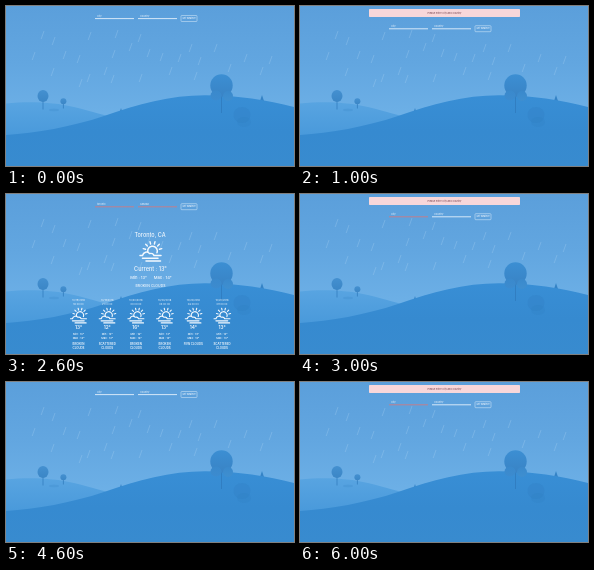
Write an HTML page with a canvas that moves like this. It is 288 px wide and 160 px high and loops after 7000 ms.

```html
<!DOCTYPE html>
<html lang="en">
<head>
<meta charset="utf-8">
<title>Weather</title>
<style>
html, body { margin: 0; width: 100%; height: 100%; overflow: hidden; background: #64a9df; }
canvas { display: block; width: 288px; height: 160px; }
</style>
</head>
<body>
<canvas id="stage"></canvas>
<script>
const W = 288, H = 160, STEP = 1000;
const FONT = 'Inter, "Liberation Sans", sans-serif';
const WHITE = '#f4f9fe', RED = '#d8787c', PINK = '#f8d7da';

const canvas = document.getElementById('stage');
const ctx = canvas.getContext('2d');
const ratio = window.devicePixelRatio || 1;
canvas.width = W * ratio;
canvas.height = H * ratio;
ctx.scale(ratio, ratio);

const SCHEDULE = ['empty', 'warning', 'weather', 'retry', 'empty', 'weather', 'retry'];

const RAIN = [
  [38, 25], [49, 31], [85, 26], [112, 24], [29, 46], [60, 45], [74, 49],
  [109, 44], [126, 37], [135, 28], [144, 43], [157, 47], [166, 61], [175, 48],
  [186, 38], [191, 66], [211, 38], [241, 48], [257, 61], [266, 50], [108, 69],
  [84, 68], [76, 73], [101, 61], [136, 68], [225, 58], [48, 62], [195, 51]
];

const FORECAST = [
  ['10/19/2018', '18:00:00', 13, 'BROKEN'],
  ['10/19/2018', '21:00:00', 12, 'SCATTERED'],
  ['10/20/2018', '00:00:00', 16, 'BROKEN'],
  ['10/20/2018', '03:00:00', 13, 'BROKEN'],
  ['10/20/2018', '06:00:00', 14, 'FEW CLOUDS'],
  ['10/20/2018', '09:00:00', 13, 'SCATTERED']
];

function vertical(y0, y1, ...colors) {
  const g = ctx.createLinearGradient(0, y0, 0, y1);
  colors.forEach((c, i) => g.addColorStop(i / (colors.length - 1), c));
  return g;
}

function text(str, x, y, size, weight = 400, color = WHITE, align = 'center') {
  ctx.font = `${weight} ${size}px ${FONT}`;
  ctx.textAlign = align;
  ctx.textBaseline = 'middle';
  ctx.fillStyle = color;
  ctx.fillText(str, x, y);
}

function line(x0, y0, x1, y1, color, width) {
  ctx.strokeStyle = color;
  ctx.lineWidth = width;
  ctx.beginPath();
  ctx.moveTo(x0, y0);
  ctx.lineTo(x1, y1);
  ctx.stroke();
}

function fillPath(path, fill) {
  ctx.fillStyle = fill;
  ctx.fill(new Path2D(path));
}

function ellipse(x, y, rx, ry, fill) {
  ctx.fillStyle = fill;
  ctx.beginPath();
  ctx.ellipse(x, y, rx, ry, 0, 0, Math.PI * 2);
  ctx.fill();
}

function tree(x, y, rx, ry, foot, top, bottom) {
  line(x, y, x, foot, '#2f79ba', 0.7);
  ellipse(x, y, rx, ry, vertical(y - ry, y + ry, top, bottom));
}

function pine(x, foot) {
  fillPath(`M${x} ${foot - 5} l2 6 h-4Z`, '#3583c6');
}

function landscape() {
  ctx.fillStyle = vertical(0, 115, '#5b9fdb', '#62a6e0', '#6eb1e7');
  ctx.fillRect(0, 0, W, H);

  for (const [x, y] of RAIN) line(x, y, x - 2.8, y + 8, 'rgba(180,215,244,.5)', 0.55);

  fillPath('M0 97.5 C22 95 48 96 68 101 S98 109 112 113 L112 160 H0Z',
    vertical(96, 128, '#58a4e1', '#4a9adb'));
  ellipse(48, 104, 5, 1.2, 'rgba(63,139,203,.35)');
  tree(37, 90, 5.5, 6, 103.5, '#4490d0', '#3b86c6');
  tree(57.4, 95.3, 3, 3, 102.5, '#4490d0', '#3b86c6');

  pine(115, 107);
  pine(256, 94);
  fillPath('M0 129 C30 127 65 121 98 110 C132 98 164 89.2 199 89.2 C232 89.2 261 94 288 101 V160 H0Z',
    vertical(90, 160, '#388ed5', '#368ad0', '#388bcf'));

  tree(215.5, 79.5, 11.2, 11.2, 107, '#3c8fd3', '#3983c5');
  tree(210, 89.5, 5.5, 5, 94, '#3a89cc', '#3c8bcf');
  tree(222, 90, 5, 5, 95, '#3a89cc', '#3f8fd0');
  ellipse(236, 109, 8.5, 8, 'rgba(42,117,183,.18)');
  ellipse(238, 116, 7, 5, 'rgba(42,117,183,.14)');
}

function field(label, x, y, labelColor, lineColor) {
  text(label, x + 2, y - 2.7, 2.5, 400, labelColor, 'left');
  line(x, y, x + 39, y, lineColor, 0.8);
}

function form(y, cityLabel, countryLabel, cityColor, countryColor) {
  field(cityLabel, 89, y, WHITE, cityColor);
  field(countryLabel, 132, y, WHITE, countryColor);
  ctx.strokeStyle = 'rgba(244,249,254,.85)';
  ctx.lineWidth = 0.5;
  ctx.beginPath();
  ctx.roundRect(175, y - 3.1, 16, 6, 0.8);
  ctx.stroke();
  text('Get Weather', 183, y, 2.2, 500);
}

function banner() {
  ctx.fillStyle = PINK;
  ctx.beginPath();
  ctx.roundRect(69, 3, 151, 8, 0.7);
  ctx.fill();
  text('Please Enter City and Country', 144.5, 7.1, 2.4, 400, '#713b46');
}

// Half sun behind a low cloud, resting on two haze lines.
function cloudySun(x, y, scale) {
  ctx.save();
  ctx.translate(x, y);
  ctx.scale(scale, scale);
  ctx.lineCap = 'round';
  ctx.lineJoin = 'round';
  for (let i = 0; i < 6; i++) {
    const a = Math.PI * (1.08 + i * 0.168), c = Math.cos(a), s = Math.sin(a);
    line(2 + c * 7.2, s * 7.2, 2 + c * 9.6, s * 9.6, WHITE, 1.4);
  }
  ctx.lineWidth = 1.5;
  ctx.beginPath();
  ctx.arc(2, 0, 4.8, Math.PI * 0.95, Math.PI * 0.12);
  ctx.stroke();
  ctx.stroke(new Path2D('M-10.5 4.5 H-8 C-7 1 -3 0 -1 2.6 C1 2 3 3 3.5 4.5 H10.5'));
  line(-8, 7.3, 7.5, 7.3, WHITE, 1.5);
  line(-4.5, 10, 10, 10, WHITE, 1.5);
  ctx.restore();
}

function weather() {
  text('Toronto, CA', 144, 41, 5.5, 500);
  cloudySun(144.5, 57, 1);
  text('Current : 13°', 144.5, 75.7, 5.5, 500);
  text('Min : 13°', 132.5, 84, 4.1, 500);
  text('Max : 14°', 156.7, 84, 4.1, 500);
  text('BROKEN CLOUDS', 144.5, 92, 3.5, 500);

  FORECAST.forEach(([date, time, degrees, sky], i) => {
    const x = 72.5 + i * 28.7;
    text(date, x, 106.7, 2.5);
    text(time, x, 110.5, 2.5);
    cloudySun(x, 121.3, 0.76);
    text(degrees + '°', x, 133.5, 4.7, 600);
    text(`Min : ${degrees}°`, x, 140, 2.7, 500);
    text(`Max : ${degrees}°`, x, 144, 2.7, 500);
    text(sky, x, 149.8, 2.9, 600);
    if (!sky.includes('CLOUDS')) text('CLOUDS', x, 154.4, 2.9, 600);
  });
}

const SCENES = {
  empty() { form(12.6, 'City', 'Country', WHITE, WHITE); },
  warning() { banner(); form(22.8, 'City', 'Country', WHITE, WHITE); },
  weather() { form(12.8, 'toronto', 'canada', RED, RED); weather(); },
  retry() { banner(); form(22.8, 'City', 'Country', RED, WHITE); }
};

function draw() {
  const elapsed = performance.now() - start;
  landscape();
  SCENES[SCHEDULE[Math.floor(elapsed / STEP) % SCHEDULE.length]]();
  requestAnimationFrame(draw);
}

const start = performance.now();
draw();
</script>
</body>
</html>
```
